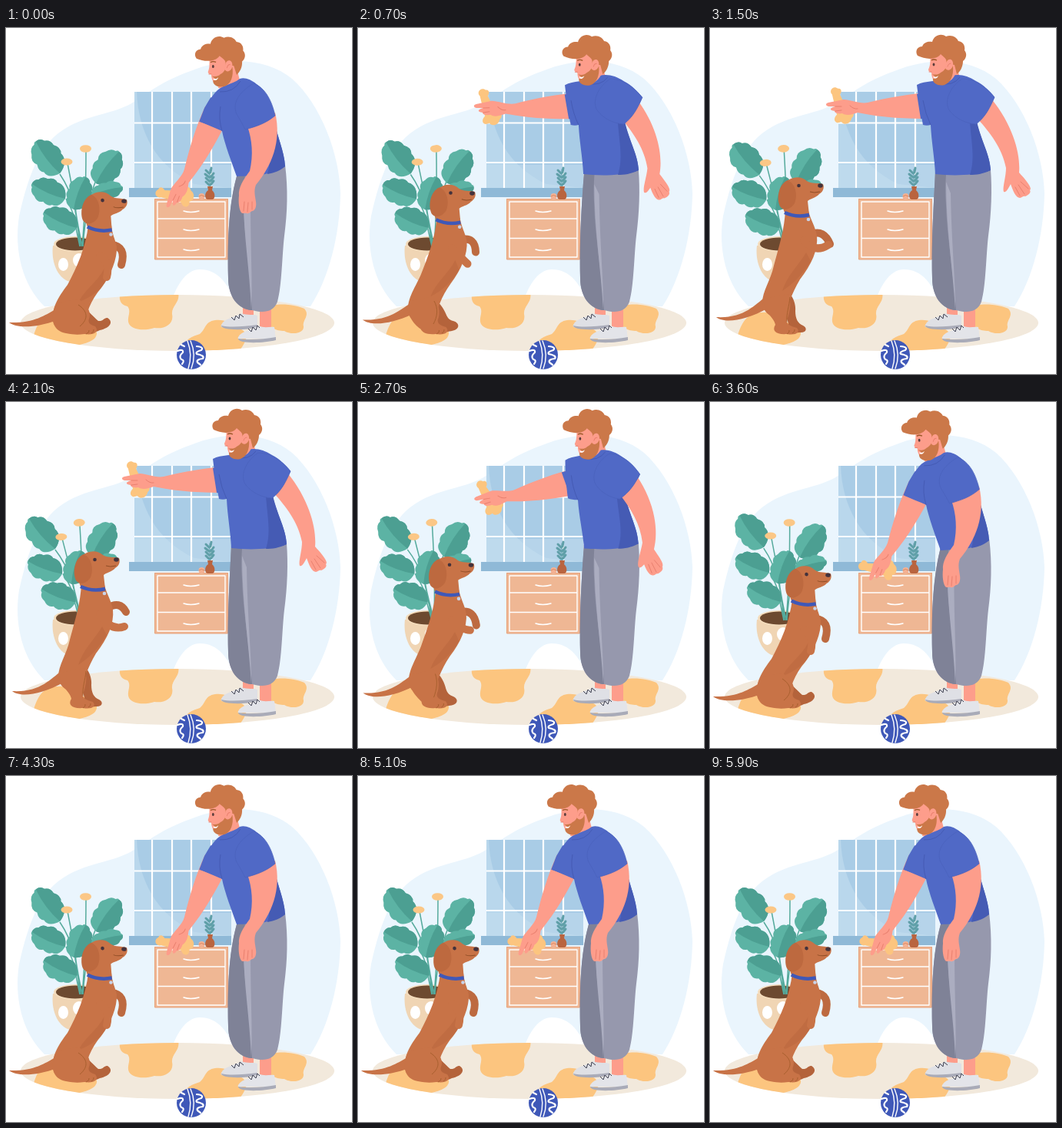
Write an HTML page that moves like this. It is 450 px wide and 450 px high and loops after 6 s.

```html
<!DOCTYPE html>
<html lang="en">
<head>
<meta charset="utf-8">
<title>Dog training</title>
<style>
  html, body { margin: 0; width: 100%; height: 100%; overflow: hidden; background: #fff; }
  svg { display: block; width: 100vw; height: 100vh; }
  .line { fill: none; stroke: #fff; stroke-width: 1.4; stroke-linecap: round; stroke-linejoin: round; }
  .bold { stroke-width: 2.2; }
  .stem { fill: none; stroke: #55aa9c; stroke-width: 1.5; }
  .skin { fill: #fd9d8b; }
  .fold { fill: none; stroke: #e9806f; stroke-width: 1; stroke-linecap: round; }
  .hair { fill: #cb7849; }
  .shirt { fill: #5069c6; }
  .shade { fill: #455bb4; }
  .fur { fill: #c87347; }
  .dark { fill: #b4633b; }
  .leg { fill: none; stroke: #c87347; stroke-width: 10; stroke-linecap: round; stroke-linejoin: round; }
  .far { stroke: #bd6a40; }
  .gold { fill: #fcc57f; }
</style>
</head>
<body>
<svg viewBox="0 0 450 450">
  <defs>
    <g id="leaf">
      <path fill="#5cb3a4" d="M0 0C1-8 5-16 13-15Q18-20 26-16Q33-21 40-14Q48-11 48-4Q51-2 50 0Q50 7 44 9Q41 16 33 15Q25 21 19 16C9 18 2 9 0 0Z"/>
      <path fill="#4c9f92" d="M0 0Q25-5 50 0Q50 7 44 9Q41 16 33 15Q25 21 19 16C9 18 2 9 0 0Z"/>
    </g>
    <clipPath id="rug"><ellipse cx="223" cy="383.500" rx="204" ry="36.500"/></clipPath>
    <clipPath id="pane"><path d="M167 83H293V208H167Z"/></clipPath>
  </defs>

  <!-- room -->
  <path fill="#eaf5fd" d="M165 97C135 115 95 112 62 142C38 165 26 205 17 245C10 290 22 335 50 362H213C220 338 233 314 252 314C275 314 290 332 300 362H396C420 325 434 270 435 215C434 165 410 100 372 66C340 40 290 36 240 56C205 68 185 84 165 97Z"/>
  <g clip-path="url(#pane)">
    <path fill="#b9d7ec" d="M167 83H293V208H167Z"/>
    <path fill="#a9cce6" d="M170 83C172 135 195 180 245 203L293 208V83Z"/>
    <path fill="#c3ddef" d="M167 178H293V208H167Z" opacity=".5"/>
    <path class="line bold" d="M190 83V208M216 83V208M241 83V208M267 83V208M167 123.500H293M167 175H293"/>
  </g>
  <path fill="#8fb9d7" d="M160 208H293V220H160Z"/>
  <path fill="#efb794" d="M193 222H289V301H193Z"/>
  <path class="line" d="M197 226H285V298H197ZM197 248H285M197 273.500H285M231 238Q240 241 251 238M231 262Q240 265 251 262M231 288Q240 291 251 288"/>
  <path fill="none" stroke="#e8a27c" d="M193.500 222.500H288.500V301H193.500Z"/>
  <g fill="none" stroke="#5f9fa8" stroke-width="3" stroke-linecap="round">
    <path stroke-width="1" d="M265 208V184"/>
    <path d="M264 204L260 200M264 199L260 195M264 194L259 190M264 189L260 185M266 204L270 199M266 199L270 194M266 194L270 189M266 188L267 182"/>
  </g>
  <path fill="#b9643f" d="M262 206H269L268 211C273 215 272 223 268 223H262C258 222 258 214 263 211Z"/>
  <circle cx="254.500" cy="219" r="4" fill="#f4b193"/>
  <path fill="none" stroke="#d98963" d="M251 219Q254 216 258 219"/>

  <g clip-path="url(#rug)">
    <path fill="#f2e9dc" d="M0 340H450V425H0Z"/>
    <path class="gold" d="M148 345H224C227 356 215 362 216 372C219 385 206 392 193 390C180 394 165 393 160 385C156 377 164 369 158 362C149 360 147 354 148 345Z"/>
    <path class="gold" d="M36 400C42 380 50 370 68 370C82 368 88 378 98 382C112 386 124 394 115 404C106 412 80 418 36 412Z"/>
    <path class="gold" d="M234 422C228 406 240 402 252 398C260 392 258 382 272 380C290 378 298 389 308 393C318 402 308 414 300 424Z"/>
    <path class="gold" d="M340 364C350 356 378 360 388 365C396 374 385 380 387 388C388 397 372 400 362 394C352 394 340 390 338 378Z"/>
  </g>

  <!-- plant -->
  <path fill="#f0d5b4" d="M61 283C58 308 70 328 84 330H101C114 326 121 305 118 283Z"/>
  <path fill="#dfb78b" d="M105 285C108 305 102 320 94 330H101C114 326 121 305 118 283Z"/>
  <ellipse cx="74.500" cy="307.500" rx="6.500" ry="8.500" fill="#fff"/>
  <ellipse cx="95" cy="302" rx="8" ry="9" fill="#fff"/>
  <ellipse cx="90" cy="281" rx="28" ry="10" fill="#f4dcbc"/>
  <ellipse cx="90" cy="281" rx="25" ry="8.500" fill="#6d4a30"/>
  <g id="plant">
    <path class="stem" d="M96 284Q92 235 80 176M99 284Q104 230 104 160M96 284Q94 225 70 190M97 284Q94 250 78 222M96 284L91 260M100 284Q104 230 117 198M99 284L90 238"/>
    <use href="#leaf" transform="translate(70 189) rotate(-127) scale(1.040)"/>
    <use href="#leaf" transform="translate(77 222) rotate(-156) scale(.95)"/>
    <use href="#leaf" transform="translate(92 260) rotate(-155) scale(.95)"/>
    <use href="#leaf" transform="translate(117 202) rotate(-54) scale(1.020 1)"/>
    <use href="#leaf" transform="translate(112 217) rotate(-14) scale(.82 .66)"/>
    <use href="#leaf" transform="translate(88 236) rotate(-70) scale(.9)"/>
    <ellipse cx="79" cy="174" rx="7.500" ry="4.500" fill="#fbc786"/>
    <ellipse cx="103.500" cy="157" rx="7.500" ry="4.800" fill="#fbc786"/>
  </g>

  <!-- dog -->
  <path class="fur" data-by="dog"
    d="M64 366C50 374 36 384 4 383C14 391 40 390 66 380Z"
    data-to="M72 350C58 360 44 378 8 376C18 384 44 382 76 364Z"/>
  <path class="dark" data-by="dog"
    d="M88 368C96 380 100 386 104 392C108 396 114 397 122 393C136 390 140 382 132 377C128 376 126 382 120 381C114 376 108 368 100 364Z"
    data-to="M92 360C96 372 102 380 102 386C102 394 108 397 116 396C126 397 127 390 121 387C114 384 111 378 111 368C112 360 108 350 104 346Z"/>
  <path id="pawFar" class="leg far"/>
  <path class="fur" data-by="dog"
    d="M107 256C104 285 92 312 80 334C68 350 56 368 63 386C74 400 92 398 102 386C104 372 110 354 124 338C136 322 145 300 144 284C142 275 138 268 137 256Z"
    data-to="M98 236C97 262 90 283 83 309C79 328 68 342 68 358C70 373 84 380 96 372C102 362 106 345 117 327C132 308 141 288 139 270C137 258 131 250 128 238Z"/>
  <path fill="#b3633a" opacity=".4" data-by="dog"
    d="M128 312C120 330 102 340 95 356C112 350 124 340 132 326Z"
    data-to="M125 292C116 308 100 322 94 342C106 334 120 322 131 303Z"/>
  <path class="fur" data-by="dog"
    d="M66 358C56 376 60 394 78 397C88 399 94 399 102 398C114 400 122 395 116 388C110 386 106 384 108 378C112 370 104 356 92 352Z"
    data-to="M70 352C68 370 84 376 85 386C80 394 86 399 100 398C112 400 118 396 113 390C106 388 99 386 100 380C103 372 107 358 102 346Z"/>
  <path fill="none" stroke="#a9602f" data-by="dog"
    d="M94 360C106 368 108 378 96 388M104 398Q109 396 108 393M111 397Q115 395 114 392"
    data-to="M104 350C103 362 99 372 100 382M100 398Q104 396 103 393M107 397Q111 395 110 392"/>
  <path id="pawNear" class="leg"/>
  <g id="dogHead">
    <path class="fur" d="M98 242C91 226 90 208 99 200C106 193 119 192 126 199C132 203 140 201 147 203C149 208 147 213 142 216C138 221 130 222 127 225L129 243Z"/>
    <path fill="none" stroke="#8f4d26" d="M143 213Q135 215 130 213"/>
    <path fill="#bd693f" d="M101 198C89 203 86 222 91 232C96 239 105 236 110 228C114 218 112 203 101 198Z"/>
    <ellipse cx="143.500" cy="205" rx="3.300" ry="2.700" fill="#43323c"/>
    <circle cx="115.500" cy="205" r="2.300" fill="#43323c"/>
    <path fill="none" stroke="#3f58b8" stroke-width="4.500" d="M97 240Q112 247 129 243"/>
    <circle cx="128" cy="249" r="2.300" fill="#c9d3e8"/>
  </g>

  <!-- man -->
  <path class="skin" d="M308 358H322V380H308ZM330 360H345V394H330Z"/>
  <path fill="#dfe0e5" d="M280 386C284 377 297 377 306 371C314 374 322 372 327 374V389H284C280 390 279 388 280 386Z"/>
  <path fill="#a9abb8" d="M280 387C292 390 310 388 327 386V389C310 394 280 393 280 387Z"/>
  <path fill="#e3e4e9" d="M302 402C306 394 318 394 328 387C336 391 343 388 349 389L351 404H308C302 406 301 404 302 402Z"/>
  <path fill="#a9abb8" d="M302 404C316 406 335 405 351 402V406C335 410 302 411 302 404Z"/>
  <path fill="none" stroke="#3a3c4c" d="M293 376L297 380L299 374L303 378L304 372L309 376M315 391L319 395L321 389L325 393L327 387L330 390"/>
  <path fill="#9698ad" data-by="body"
    d="M302 186C290 225 288 270 289 325C289 350 302 366 320 367C334 371 348 370 353 356C359 335 359 295 362 270C366 240 367 210 363 178Z"
    data-to="M293 186C291 230 288 270 289 325C289 350 302 366 320 367C334 371 348 370 353 356C359 335 359 295 362 270C366 240 367 210 365 184Z"/>
  <path fill="#7f8297" data-by="body"
    d="M302 186C290 225 288 270 289 325C289 350 302 366 320 367C320 320 309 270 309 230C309 215 310 205 311 190Z"
    data-to="M293 186C291 230 288 270 289 325C289 350 302 366 320 367C317 320 308 270 307 230C306 215 306 205 307 190Z"/>
  <path fill="#abadc0" data-by="body"
    d="M309 225C309 270 317 315 319 366C321 340 318 290 318 225Z"
    data-to="M307 200C307 260 316 315 319 366C320 340 314 280 313 215Z"/>

  <g id="arm">
    <path class="gold" transform="rotate(-11 -112 5)" d="M-118-12C-122-18-114-24-109-18C-104-18-105-12-108-10L-102 13C-95 13-93 20-99 23C-102 31-112 30-113 25C-122 28-124 19-117 15Z"/>
    <path class="skin" d="M10-13C-20-12-50-6-75 0C-85 2-98-4-106-4L-126 0C-130 1-130 4-126 5L-117 5C-125 7-125 10-118 11C-118 14-112 15-108 14C-102 18-94 15-88 13C-55 20-25 21 10 21Z"/>
    <path class="fold" d="M-117 5L-109 5M-117 11L-109 10M-98 4Q-93 9-88 8"/>
    <path class="shirt" d="M-11-11L-6 21L26 22L24-12L8-13Z"/>
  </g>
  <path class="skin" data-by="body"
    d="M278 56L276 78Q292 80 304 68L300 52Z"
    data-to="M299 54L298 72Q314 76 325 66L322 52Z"/>
  <path class="shirt" data-by="arm"
    d="M272 84C280 74 294 74 304 66C316 62 332 76 339 88C344 96 347 104 350 114C348 116 348 118 349 120C352 140 362 160 363 180C345 192 322 192 300 193C294 176 284 150 281 134C272 130 262 126 253 122C256 108 262 96 272 84Z"
    data-to="M269 74C280 68 296 70 306 66C318 58 332 60 346 69C356 74 364 82 370 90C364 106 354 118 347 124C354 150 364 165 365 185C340 193 312 192 293 190C292 168 288 148 287 126C284 127 280 127 277 126C274 110 271 90 269 74Z"/>
  <path class="shade" data-by="arm"
    d="M349 120C352 140 362 160 363 180C356 186 350 188 340 190C348 165 335 150 330 125Z"
    data-to="M347 122C354 150 364 165 365 185C355 190 346 191 338 191C345 170 340 150 338 122Z"/>
  <path fill="none" stroke="#455bb4" data-by="arm"
    d="M281 134Q276 118 279 102M278 83Q296 84 305 69"
    data-to="M287 126Q280 112 277 94M298 72Q316 76 325 64"/>
  <path class="skin" data-by="hand"
    d="M314 128C320 145 322 165 317 186C308 198 302 208 303 218C302 226 303 236 306 240C308 242 311 240 313 241C316 242 318 239 320 238C324 238 326 232 325 226C324 218 322 212 325 204C345 180 359 148 350 110Z"
    data-to="M348 118C364 136 380 156 385 182C385 194 380 208 382 213C385 215 389 207 391 203C394 212 398 221 403 221C406 221 407 218 410 219C414 217 418 214 416 211C420 208 410 197 402 188C404 165 395 128 366 92Z"/>
  <path class="fold" data-by="hand"
    d="M310 226L309 238M315 227L314 239M320 226L320 236"
    data-to="M397 207L403 218M401 204L409 216M404 200L414 209"/>
  <path class="shirt" stroke="#4b62bd" stroke-width=".8" data-by="arm"
    d="M322 72C302 84 294 98 300 112C306 122 308 126 311 132C326 128 338 124 350 114C346 96 338 78 322 72"
    data-to="M328 66C310 78 304 98 312 108C320 118 332 124 346 125C358 116 364 104 370 90C360 78 345 66 328 66"/>

  <g id="head">
    <path class="skin" d="M287 36C286 44 287 48 284 54C284 57 287 57 288 58C288 66 292 72 300 73C312 72 320 64 321 52L318 30H292Z"/>
    <path class="hair" d="M289 60C293 61 297 61 300 58C306 55 308 50 309 44L316 50C317 62 313 71 305 74C297 76 289 72 290 66L295 65Z"/>
    <path class="hair" d="M270 36C266 30 270 24 276 24C278 18 285 17 289 18C291 10 300 6 307 11C314 8 321 12 323 17C330 18 332 24 331 29C335 34 333 40 329 43C329 51 325 57 321 60L318 48L307 46C309 40 304 38 300 34C294 42 280 41 270 36Z"/>
    <path class="skin" d="M307 45C310 38 317 40 316 48C315 55 308 57 306 52Z"/>
    <path class="fold" d="M309 50Q310 46 313 46M285 57L288 57"/>
    <path fill="#fff" d="M290 63Q294 65 297 62Q295 67 291 65Z"/>
    <path fill="none" stroke="#9b5727" stroke-width="1.300" d="M288 42Q291 40 295 42"/>
    <ellipse cx="291" cy="47.500" rx="1.400" ry="2" fill="#5a3c3c"/>
  </g>

  <!-- ball -->
  <circle cx="241" cy="425" r="19" fill="#3f58b8"/>
  <path class="line" d="M236 407Q243 425 237 443M240 407Q248 425 241 443"/>
  <path class="line bold" d="M248 414Q258 415 254 419Q246 421 248 424Q259 426 256 430Q247 431 249 435L253 438M223 420Q231 417 230 422Q224 427 228 431Q233 432 229 437M228 412L232 414"/>
</svg>
<script>
  const LOOP = 6000, STEP = 100;
  const $ = id => document.getElementById(id);
  const lerp = (a, b, k) => a + (b - a) * k;

  const ease = (t, from, to) => {
    const x = Math.min(1, Math.max(0, (t - from) / (to - from)));
    return x * x * (3 - 2 * x);
  };
  // rise start, rise end, fall start, fall end
  const times = {
    body: [0, 900, 2400, 3950],
    arm: [0, 750, 2350, 3700],
    hand: [0, 900, 2350, 3500],
    dog: [0, 1400, 2300, 3300],
    plant: [200, 1700, 2500, 3750]
  };

  const size = { M: 2, L: 2, Q: 4, C: 6, Z: 0 };
  const numbers = d => d.match(/-?\d*\.?\d+/g).map(Number);
  const morphs = [...document.querySelectorAll('[data-by]')].map(el => {
    const d = el.getAttribute('d');
    return { el, by: el.dataset.by, a: numbers(d), b: numbers(el.dataset.to), cmds: d.match(/[A-Z]/g) };
  });

  function blend({ a, b, cmds }, k) {
    let i = 0;
    return cmds.map(c => {
      let s = c;
      for (let n = size[c]; n--; i++) s += lerp(a[i], b[i], k).toFixed(2) + ' ';
      return s;
    }).join('');
  }

  // front leg: shoulder, elbow, paw as [rest, raised] pairs
  function paw(id, k, lift, x, y) {
    const p = i => [lerp(...x[i], k), lerp(...y[i], k) + lift * k * i / 2];
    $(id).setAttribute('d', `M${p(0)}Q${p(1)} ${p(2)}`);
  }

  const move = (id, value) => $(id).setAttribute('transform', value);

  function draw(now) {
    const t = Math.floor(now / STEP) * STEP % LOOP;
    const k = {};
    for (const [name, [a, b, c, d]] of Object.entries(times))
      k[name] = ease(t, a, b) - ease(t, c, d);

    for (const m of morphs) m.el.setAttribute('d', blend(m, k[m.by]));

    move('plant', `rotate(${-3.7 * k.plant} 98 285)`);
    move('arm', `translate(${lerp(266, 280, k.arm)} ${lerp(117, 97, k.arm)}) rotate(${lerp(-63, 0, k.arm)})`);
    const lean = 1 - k.body, crouch = 1 - k.dog;
    move('head', `translate(${-21 * lean} ${2 * lean}) rotate(${-3 * lean} 302 60)`);
    move('dogHead', `translate(${9.5 * crouch} ${19 * crouch}) rotate(${2 * crouch} 112 220)`);

    const wave = Math.cos((t - 1500) / 1200 * 2 * Math.PI);
    paw('pawNear', k.dog, -5 * wave, [[122, 122], [136, 136], [131, 154]], [[296, 276], [304, 296], [324, 287]]);
    paw('pawFar', k.dog, 4 * wave, [[137, 132], [157, 148], [150, 156]], [[282, 268], [284, 260], [308, 277]]);
    requestAnimationFrame(draw);
  }
  requestAnimationFrame(draw);
</script>
</body>
</html>
```
